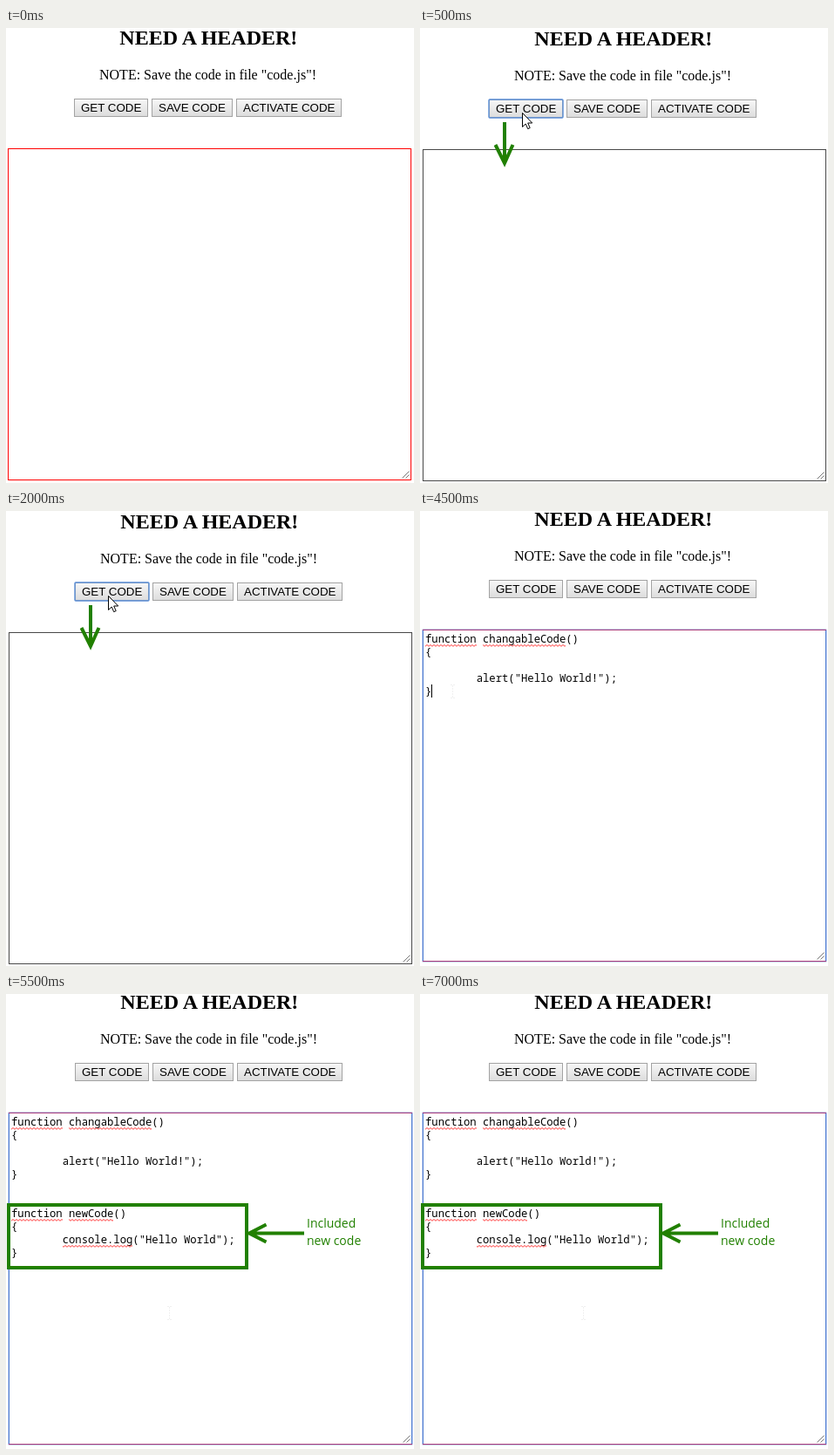
An HTML page that plays this animation: 468 px wide and 522 px high, repeating every 8 s.

```html
<!DOCTYPE html>
<html lang="en">
<head>
<meta charset="utf-8">
<title>Code page demo</title>
<style>
  html, body { margin: 0; width: 100%; height: 100%; overflow: hidden; background: #fff; }
  svg { display: block; width: 468px; height: 522px; }

  .page, .scene { animation: 8s step-end infinite; }
  .page { animation-name: shift; }
  .idle { animation-name: idle; }
  .click { animation-name: click; }
  .code { animation-name: code; }
  .first { animation-name: first; }
  .added { animation-name: added; }

  @keyframes shift {
    0% { transform: translate(-1px, -1px); }
    6.25% { transform: none; }
    37.5%, 100% { transform: translate(0, -3px); }
  }
  @keyframes idle { 0% { visibility: visible; } 6.25%, 100% { visibility: hidden; } }
  @keyframes click { 0% { visibility: hidden; } 6.25% { visibility: visible; } 37.5%, 100% { visibility: hidden; } }
  @keyframes code { 0% { visibility: hidden; } 37.5%, 100% { visibility: visible; } }
  @keyframes first { 0% { visibility: hidden; } 37.5% { visibility: visible; } 68.75%, 100% { visibility: hidden; } }
  @keyframes added { 0% { visibility: hidden; } 68.75%, 100% { visibility: visible; } }

  .title { font: bold 24px "Liberation Serif", serif; }
  .note { font: 16px "Liberation Serif", serif; }
  .label { font: 13.333px "Liberation Sans", sans-serif; }
  .mono { font: 12.22px "Noto Sans Mono", monospace; }
  .callout { font: 14px "Open Sans", sans-serif; fill: #218000; }
  .button { fill: url(#face); stroke: #a3a3a3; }
  .mark { fill: none; stroke: #218000; stroke-width: 4; }
  .field { fill: none; }
</style>
</head>
<body>
<svg viewBox="0 0 468 522">
  <defs>
    <linearGradient id="face" x2="0" y2="1">
      <stop offset="0" stop-color="#f7f7f7"/>
      <stop offset="1" stop-color="#dcdcdc"/>
    </linearGradient>
    <pattern id="wave" width="4" height="3" patternUnits="userSpaceOnUse">
      <path d="M-1 1.25L0 .5L2 2.3L4 .5L5 1.25" fill="none" stroke="#f22" stroke-width=".9"/>
    </pattern>
    <path id="beam" d="M-2 .5H0M1 .5H3M.5 1V15M-2 15.5H0M1 15.5H3" fill="none" stroke="#f0f0f0" stroke-dasharray="2 1"/>
  </defs>

  <g class="page">
    <text class="title" x="131.3" y="20">NEED A HEADER!</text>
    <text class="note" x="108" y="60">NOTE: Save the code in file "code.js"!</text>
    <rect class="button" x="79.5" y="82.5" width="84" height="20"/>
    <rect class="button" x="168.5" y="82.5" width="92" height="20"/>
    <rect class="button" x="265.5" y="82.5" width="120" height="20"/>
    <g class="label">
      <text x="87" y="97">GET CODE</text>
      <text x="176" y="97">SAVE CODE</text>
      <text x="273" y="97">ACTIVATE CODE</text>
    </g>
    <path d="M455.5 517.5L463.5 509.5M459.5 517.5L463.5 513.5" stroke="#777"/>
    <rect class="field scene idle" x="3.5" y="139.5" width="462" height="380" stroke="#f00"/>
    <rect class="field scene click" x="3.5" y="139.5" width="462" height="380" stroke="#484848"/>
    <g class="field scene code">
      <rect x="2.5" y="138.5" width="464" height="382" rx="1" stroke="#bccbf2" stroke-width=".8"/>
      <path d="M3.5 139V520M465.5 139V520" stroke="#4778cf"/>
      <path d="M3 139.5H466M3 519.5H466" stroke="#a83a78"/>
    </g>
  </g>

  <g class="scene click">
    <rect x="79" y="82" width="85" height="21" rx="1" fill="none" stroke="#5b8fd8" stroke-width="1.4"/>
    <path class="mark" d="M97 108V154M86.5 134L97 155L106.5 134"/>
    <path d="M117.5 97.5V113.5L121.2 110L123.7 115.7L126.2 114.6L123.7 109H128.7Z" fill="#fff" stroke="#000"/>
  </g>

  <g class="scene code">
    <g class="mono">
      <text x="6" y="151">function changableCode()</text>
      <text x="6" y="166">{</text>
      <text x="64.7" y="196">alert("Hello World!");</text>
      <text x="6" y="211">}</text>
    </g>
    <g fill="url(#wave)">
      <rect x="6" y="153" width="59" height="3"/>
      <rect x="72" y="153" width="95" height="3"/>
    </g>
  </g>

  <g class="scene first">
    <path d="M13.5 199V214" stroke="#000"/>
    <use href="#beam" x="37" y="199"/>
  </g>

  <g class="scene added">
    <g class="mono">
      <text x="6" y="256">function newCode()</text>
      <text x="6" y="271">{</text>
      <text x="64.7" y="286">console.log("Hello World");</text>
      <text x="6" y="301">}</text>
    </g>
    <g fill="url(#wave)">
      <rect x="6" y="258" width="59" height="3"/>
      <rect x="72" y="258" width="51" height="3"/>
      <rect x="65" y="288" width="80" height="3"/>
    </g>
    <rect class="mark" x="3" y="242" width="273" height="72"/>
    <path class="mark" d="M342 274.5H280M298.5 264.5L279 274.5L298.5 284.5"/>
    <g class="callout">
      <text x="345" y="268">Included</text>
      <text x="345" y="288">new code</text>
    </g>
    <use href="#beam" x="187" y="358"/>
  </g>
</svg>
</body>
</html>
```
